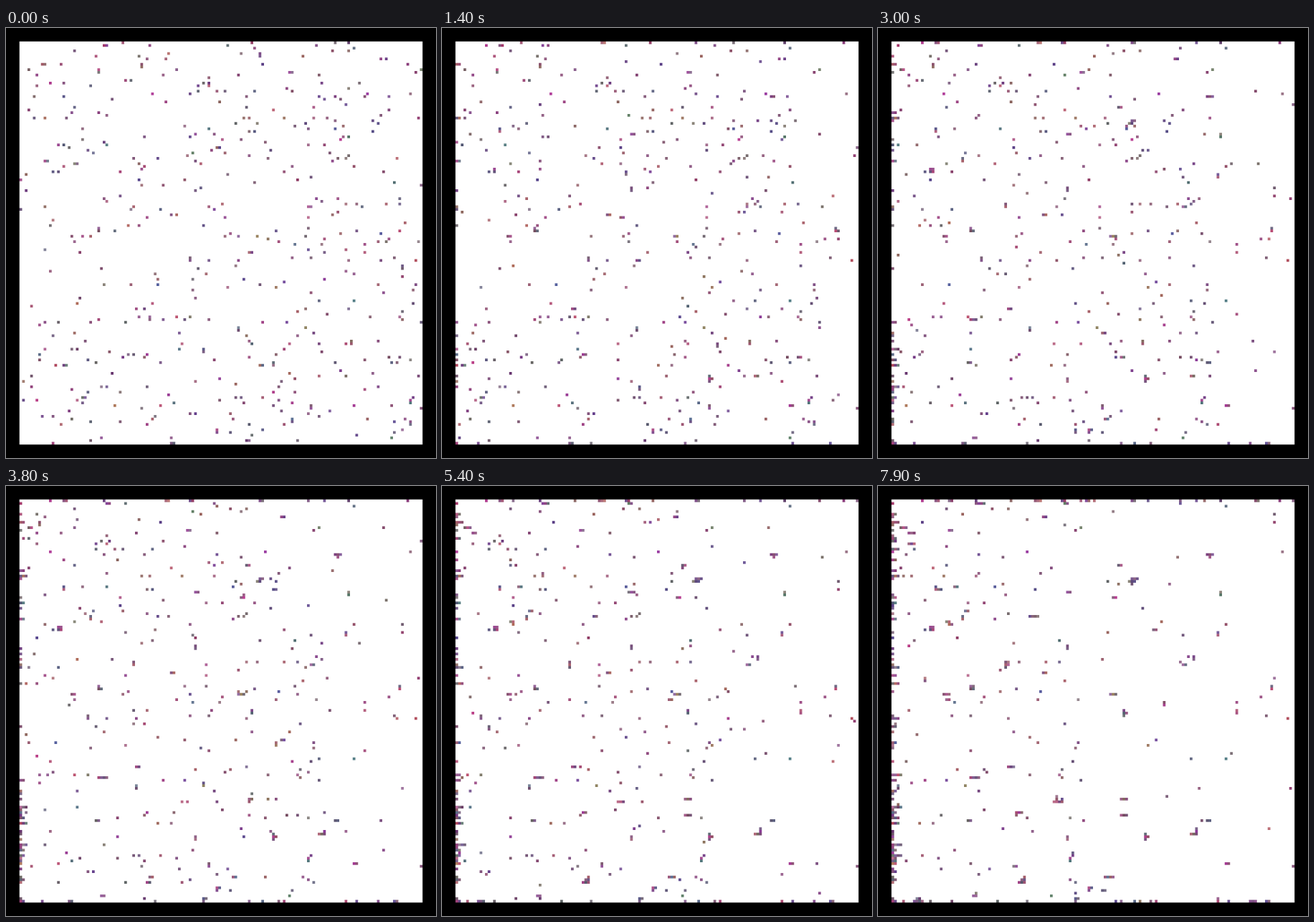
Animation, 600 px wide and 600 px high, one loop 8000 ms. Source, as a matplotlib script:

```python
import numpy as np
import matplotlib.pyplot as plt
from matplotlib.animation import FuncAnimation

SIZE, CELLS, BORDER = 600, 160, 5
N = CELLS - 2 * BORDER
STEPS = 80
LEFT, UP, DOWN, REST = (-1, 0), (0, -1), (0, 1), (0, 0)
COUNTS = {LEFT: 290, UP: 58, DOWN: 62, REST: 72}

rng = np.random.default_rng(12)


def scatter():
    """Place particles on free cells, leading ones first in each direction."""
    taken, pos, moves = set(), [], []
    for (dx, dy), count in COUNTS.items():
        group = []
        while len(group) < count:
            cell = tuple(int(v) for v in rng.integers(0, N, 2))
            if cell not in taken:
                taken.add(cell)
                group.append(cell)
        group.sort(key=lambda c: -(c[0] * dx + c[1] * dy))
        pos += group
        moves += [(dx, dy)] * count
    return pos, moves, taken


def simulate():
    """Positions at every step: one cell per step unless the way is blocked."""
    pos, moves, taken = scatter()
    history = []
    for _ in range(STEPS):
        history.append(np.array(pos))
        for i, (dx, dy) in enumerate(moves):
            x, y = pos[i]
            new = (x + dx, y + dy)
            if min(new) >= 0 and max(new) < N and new not in taken:
                taken.remove(pos[i])
                taken.add(new)
                pos[i] = new
    return history


def coverage():
    """Share of each pixel that each cell covers along one axis."""
    edge = np.arange(CELLS) * SIZE / CELLS
    px = np.arange(SIZE)[:, None]
    lo = np.maximum(px, edge)
    hi = np.minimum(px + 1, edge + SIZE / CELLS)
    return np.clip(hi - lo, 0, 1)


history = simulate()
total = len(history[0])
colors = np.column_stack([
    rng.triangular(75, 140, 195, total),
    rng.triangular(50, 95, 140, total),
    rng.triangular(85, 128, 165, total),
]) / 255
W = coverage()


def render(step):
    grid = np.zeros((CELLS, CELLS, 3))
    grid[BORDER:-BORDER, BORDER:-BORDER] = 1
    x, y = history[step].T + BORDER
    grid[y, x] = colors
    img = np.stack([W @ grid[..., c] @ W.T for c in range(3)], axis=-1)
    return np.clip(img, 0, 1)


fig = plt.figure(figsize=(6, 6), dpi=100, facecolor="black")
ax = fig.add_axes([0, 0, 1, 1])
ax.axis("off")
view = ax.imshow(render(0), interpolation="nearest", aspect="auto")


def update(step):
    view.set_data(render(step))
    return [view]


anim = FuncAnimation(fig, update, frames=STEPS, interval=100,
                     repeat=True, repeat_delay=0)
plt.show()
```
